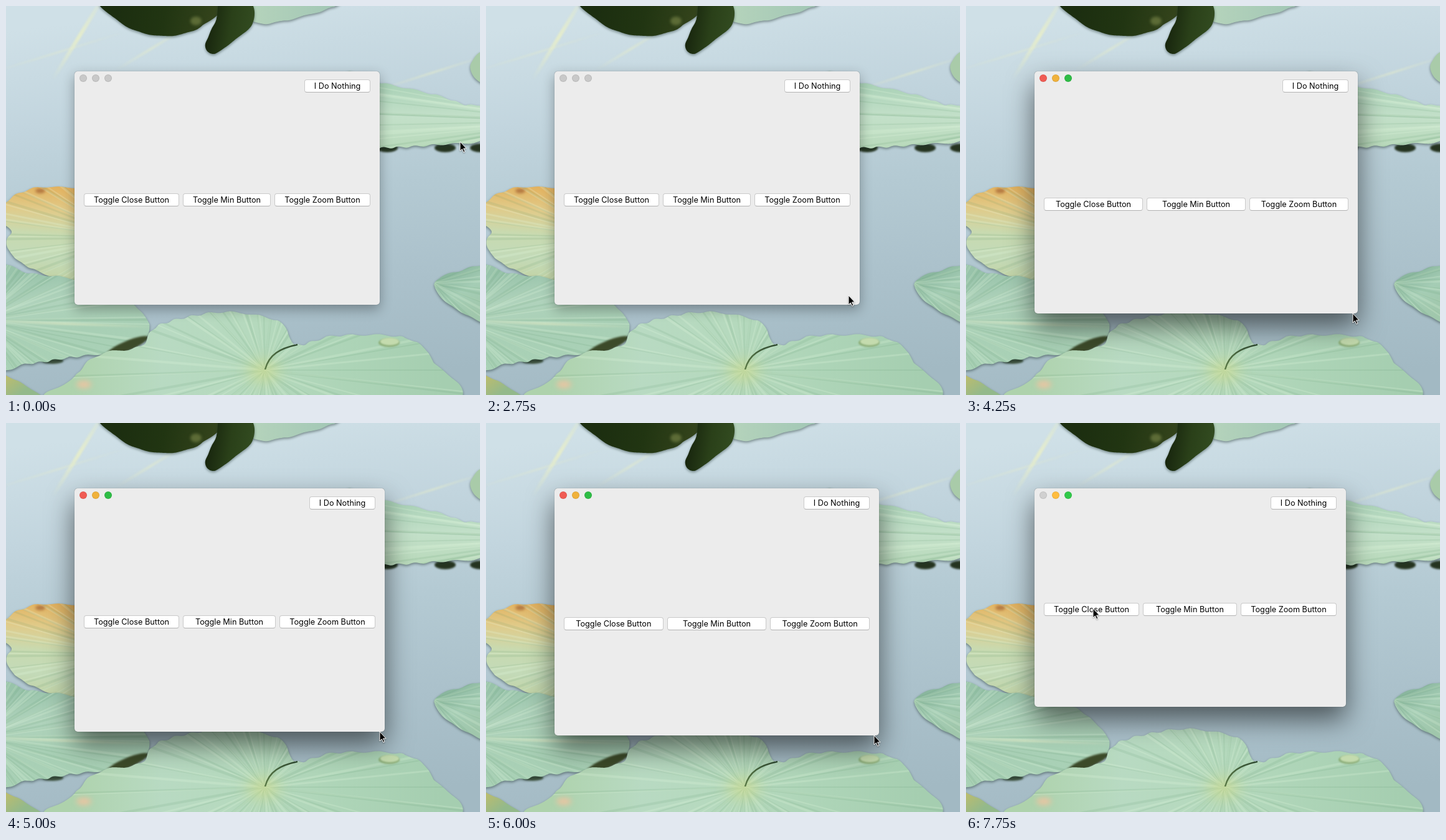
These frames come from a looping animation (761x625 px, 8 s). An HTML page with a canvas:

```html
<!DOCTYPE html>
<html lang="en">
<head>
<meta charset="utf-8">
<title>Window buttons</title>
<style>
html, body { margin: 0; width: 100%; height: 100%; overflow: hidden; }
body { position: relative; background: #b6cbd5; }
canvas, #cursor { position: absolute; left: 0; top: 0; }
canvas { filter: blur(.5px); }
#win {
  position: absolute; left: 110px; top: 105px;
  background: #ececec; border-radius: 5px;
  box-shadow: 0 0 1px rgba(0,0,0,.5), 0 7px 20px rgba(0,0,0,.32);
  font: 12.7px/19px Inter, "Open Sans", sans-serif; color: #000;
}
#win.active { box-shadow: 0 0 1px rgba(0,0,0,.55), 0 20px 44px rgba(0,0,0,.56); }
.light {
  position: absolute; top: 5px; width: 12px; height: 12px; border-radius: 50%;
  box-sizing: border-box; background: #d6d6d6; border: 1px solid rgba(0,0,0,.08);
}
.active .light { background: var(--on); }
.drag .light { filter: brightness(.94); }
.active .off { background: #d0d0d0; }
.btn {
  box-sizing: border-box; height: 21px; background: #fff; border-radius: 4px;
  border: 1px solid #cacaca; border-bottom-color: #b2b2b2;
  text-align: center; white-space: nowrap;
}
#nothing { position: absolute; right: 15px; top: 13px; width: 106px; }
#row {
  position: absolute; left: 15px; right: 15px; top: calc(50% + 8.5px);
  display: flex; gap: 6px;
}
#row .btn { flex: 1 1 0; min-width: 141px; }
#row .btn:first-child { min-width: 153px; }
#row .btn:last-child { min-width: 154px; }
#cursor { overflow: visible; filter: drop-shadow(0 1px 1px rgba(0,0,0,.35)); }
</style>
</head>
<body>
<canvas id="pond" width="761" height="625"></canvas>
<div id="win">
  <div class="light" id="close" style="left:8px; --on:#ff6259"></div>
  <div class="light" style="left:28px; --on:#ffbd40"></div>
  <div class="light" style="left:48px; --on:#31c94a"></div>
  <div class="btn" id="nothing">I Do Nothing</div>
  <div id="row">
    <div class="btn">Toggle Close Button</div>
    <div class="btn">Toggle Min Button</div>
    <div class="btn">Toggle Zoom Button</div>
  </div>
</div>
<svg id="cursor" width="13" height="20">
  <path d="M1 1V16L4.3 12.8 6.8 18.2 9 17.2 6.6 11.9H11.2Z" fill="#000" stroke="#fff"/>
</svg>
<script>
const $ = s => document.querySelector(s);
const c = $('#pond').getContext('2d');

function fade(x0, y0, x1, y1, ...colors) {
  const g = c.createLinearGradient(x0, y0, x1, y1);
  colors.forEach((col, i) => g.addColorStop(i / (colors.length - 1), col));
  return g;
}

// Smooth closed curve through x,y pairs, with a scalloped edge
function outline(p, amp) {
  const path = new Path2D(), n = p.length / 2;
  const get = (i, k) => p[(i + n) % n * 2 + k];
  const spline = (i, k, t) => {
    const [a, b, d, e] = [-1, 0, 1, 2].map(j => get(i + j, k));
    return b + t / 2 * (d - a + t * (2*a - 5*b + 4*d - e + t * (3*b - a - 3*d + e)));
  };
  let s = 0;
  for (let i = 0; i < n; i++) {
    const len = Math.hypot(get(i + 1, 0) - get(i, 0), get(i + 1, 1) - get(i, 1));
    for (let d = 0; d < len; d += 2, s += 2) {
      const wave = amp * Math.sin(s / 5 + 2 * Math.sin(s / 37));
      path.lineTo(spline(i, 0, d / len) + wave / 2, spline(i, 1, d / len) + wave);
    }
  }
  path.closePath();
  return path;
}

function leaf(points, fill, amp = 1.3, detail = () => {}) {
  const path = outline(points, amp);
  c.save();
  c.shadowColor = 'rgba(30,50,45,.5)';
  c.shadowBlur = 4;
  c.shadowOffsetY = 2;
  c.fillStyle = fill;
  c.fill(path);
  c.shadowColor = 'transparent';
  c.clip(path);
  detail();
  c.restore();
}

// Faint ribs that spread from one point
function fan(x, y, r, n, from = 0, to = Math.PI * 2) {
  for (let i = 0; i < n; i++) {
    const a = from + (to - from) * i / n + .04 * Math.sin(i * 2.3);
    c.strokeStyle = i % 2 ? 'rgba(230,248,225,.2)' : 'rgba(75,135,95,.11)';
    c.lineWidth = 2 + i % 3;
    c.beginPath();
    c.moveTo(x, y);
    c.lineTo(x + r * Math.cos(a), y + r * Math.sin(a));
    c.stroke();
  }
}

function spot(x, y, rx, ry, color, blur = 1, tilt = 0) {
  c.save();
  c.filter = `blur(${blur}px)`;
  c.fillStyle = color;
  c.beginPath();
  c.ellipse(x, y, rx, ry, tilt, 0, 7);
  c.fill();
  c.restore();
}

function streak(x0, y0, x1, y1, width, alpha) {
  const clear = 'rgba(232,238,200,0)';
  c.save();
  c.filter = 'blur(1.5px)';
  c.strokeStyle = fade(x0, y0, x1, y1, clear, `rgba(232,238,200,${alpha})`, clear);
  c.lineWidth = width;
  c.beginPath();
  c.moveTo(x0, y0);
  c.lineTo(x1, y1);
  c.stroke();
  c.restore();
}

function drawPond() {
  c.fillStyle = fade(320, 0, 400, 625, '#cfe0e7', '#c2d5de', '#b4cad3', '#abc1cb', '#a2b9c3');
  c.fillRect(0, 0, 761, 625);
  streak(160, -20, 75, 118, 6, .9);
  streak(-20, 106, 190, 42, 3, .4);
  streak(290, 34, 175, 104, 4, .5);
  streak(600, 134, 770, 80, 3, .6);

  // Top
  leaf([388,-10, 400,26, 450,23, 526,1, 520,-10], fade(390, 0, 524, 0, '#b5d3bb', '#a3c8b6'), .8);
  leaf([160,-10, 178,22, 215,42, 265,48, 315,32, 345,-10],
    fade(180, 0, 330, 30, '#1c2e10', '#213512', '#33431b'), .5,
    () => spot(305, 24, 9, 7, '#5c6b36', 2));
  leaf([345,-10, 390,-10, 396,28, 352,66, 333,77, 320,63, 338,20],
    fade(325, 30, 395, 40, '#18260e', '#2a4019', '#324b20'), .5);

  // Right
  leaf([775,72, 748,88, 750,112, 775,126], '#a9cba9', 1);
  for (const x of [612, 705, 762]) spot(x, 228, 17, 7, '#253420', 1.5);
  leaf([540,112, 600,123, 690,143, 740,159, 790,162, 780,212, 690,223, 600,228, 540,226],
    fade(0, 125, 0, 230, '#a9d1b6', '#c3e0c9', '#b8d9ba'), 1.3,
    () => fan(900, 185, 400, 26, 2.75, 3.5));
  leaf([790,420, 720,428, 688,446, 715,482, 790,510],
    fade(700, 430, 740, 500, '#86b39b', '#a5cdb5', '#a0c7ac'), 1,
    () => fan(685, 445, 120, 20, -.4, 1.2));

  // Left
  leaf([-20,332, 25,299, 80,291, 150,310, 150,430, 100,441, 30,416, 1,385, 8,360, -20,345],
    fade(70, 290, 60, 442, '#e3b25f', '#e0cb8a', '#c8dab0', '#c3dab8', '#c3d3a3'), 1.2, () => {
      fan(190, 372, 210, 30, 2.4, 3.9);
      spot(55, 297, 8, 4, 'rgba(150,80,40,.6)', 2);
    });
  for (const x of [8, 75]) spot(x, 570, 17, 5, '#3a4e3a', 1.5);
  leaf([-30,420, 40,430, 110,439, 180,460, 231,515, 190,551, 100,565, 40,574, -30,575],
    fade(60, 425, 80, 575, '#98c3aa', '#b0d3bc', '#a8cfb5', '#a9d1b6'), 1.3, () => {
      fan(-40, 505, 300, 50, -1.3, 1.2);
      streak(-60, 505, 250, 516, 3, .7);
    });
  leaf([-20,592, 25,606, 65,640, -20,640], fade(0, 598, 20, 625, '#b9bc70', '#93b98b'), 1);

  // Bottom
  spot(195, 546, 36, 8, '#3c4a29', 1.5, -.4);
  leaf([103,640, 112,595, 150,560, 215,547, 240,516, 300,498, 365,492, 440,508, 466,544,
        530,530, 640,533, 685,570, 690,640],
    fade(100, 0, 700, 0, '#aed2ac', '#b8dac2', '#b5d9bd', '#add4b7', '#a5ceb0'), 1.4, () => {
      fan(415, 585, 330, 80);
      spot(413, 587, 26, 17, 'rgba(213,220,130,.55)', 12);
      spot(125, 608, 12, 6, 'rgba(238,195,160,.9)', 4);
      c.lineWidth = 2.5;
      c.strokeStyle = fade(466, 545, 415, 585, '#2f4a31', '#5d7c48');
      c.beginPath();
      c.moveTo(468, 544);
      c.bezierCurveTo(440, 550, 422, 560, 416, 584);
      c.stroke();
      spot(615, 541, 17, 7, '#8fb07c');
      spot(616, 539, 15, 6, '#c4dbae');
    });
}

// Keys: time in s, x, y
const approach = [[0,728,217], [1,517,444], [1.5,583,486], [2.25,565,430], [2.75,581,464], [3,591,479]];
const corner = [[3.75,600,480], [4.25,629,494], [4.5,681,540], [5,608,496], [5.5,635,518],
  [5.75,673,543], [6,631,502], [6.5,610,456]];
const leave = [[6.75,600,455], [7.5,212,300], [7.75,203,297]];

function at(keys, t) {
  const next = keys.findIndex(k => k[0] > t);
  if (next < 1) return keys.at(next).slice(1);
  const [a, x, y] = keys[next - 1], [b, u, v] = keys[next];
  const f = (t - a) / (b - a);
  return [Math.round(x + (u - x) * f), Math.round(y + (v - y) * f)];
}

const win = $('#win'), cursor = $('#cursor');

function paint(now) {
  const t = Math.floor(now % 8000 / 250) / 4;
  const [right, bottom] = at(corner, t);
  const [x, y] = t < 3.25 ? at(approach, t) : t < 6.75 ? [right - 9, bottom - 1] : at(leave, t);
  cursor.style.transform = `translate(${x}px,${y}px)`;
  win.style.width = right - 110 + 'px';
  win.style.height = bottom - 105 + 'px';
  win.classList.toggle('active', t >= 3.25);
  win.classList.toggle('drag', t < 6.75);
  $('#close').classList.toggle('off', t >= 7.75);
  requestAnimationFrame(paint);
}

drawPond();
paint(0);
</script>
</body>
</html>
```
